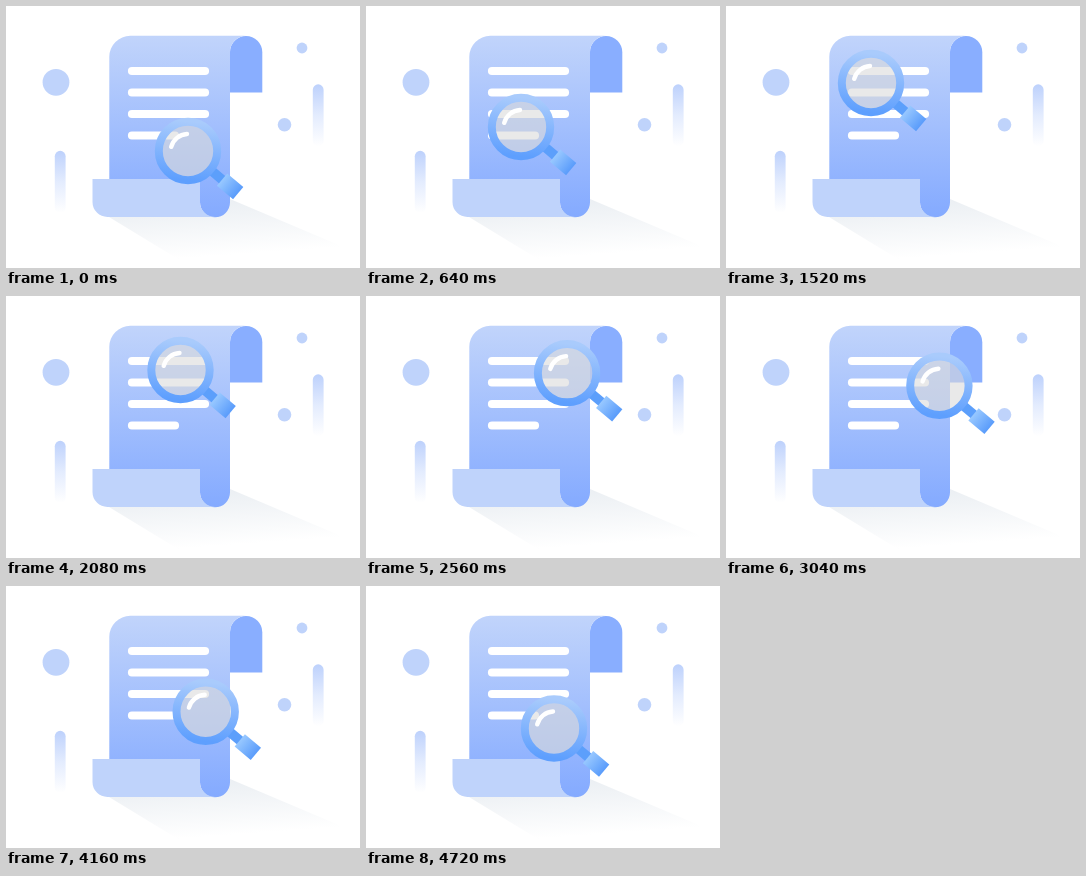
An HTML page that plays this animation: 354x262 px, repeating every 4800 ms.

```html
<!DOCTYPE html>
<html lang="en">
<head>
<meta charset="utf-8">
<title>Document search</title>
<style>
  html, body { margin: 0; width: 100%; height: 100%; overflow: hidden; background: #fff; }
  svg { display: block; width: 100%; height: 100%; }
</style>
</head>
<body>
<svg viewBox="0 0 354 262">
  <defs>
    <linearGradient id="paper" x1="0" y1="0" x2="0" y2="1">
      <stop offset="0" stop-color="#c1d4fb"/>
      <stop offset="1" stop-color="#84aaff"/>
    </linearGradient>
    <linearGradient id="fade" x1="0" y1="0" x2="0" y2="1">
      <stop offset="0" stop-color="#bdd1fc"/>
      <stop offset=".5" stop-color="#bdd1fc" stop-opacity=".42"/>
      <stop offset="1" stop-color="#bdd1fc" stop-opacity="0"/>
    </linearGradient>
    <linearGradient id="shade" gradientUnits="userSpaceOnUse" x1="205" y1="195" x2="209" y2="250">
      <stop offset="0" stop-color="#ebeff3"/>
      <stop offset="1" stop-color="#fff"/>
    </linearGradient>
    <linearGradient id="ring" x1=".55" y1="0" x2=".45" y2="1">
      <stop offset="0" stop-color="#a9cbfc"/>
      <stop offset="1" stop-color="#5e9ffe"/>
    </linearGradient>
    <linearGradient id="grip">
      <stop offset="0" stop-color="#98c8ff"/>
      <stop offset="1" stop-color="#5a9cfb"/>
    </linearGradient>
  </defs>

  <path d="M103 211L190 264H354V248L224 193H200V211Z" fill="url(#shade)"/>
  <g fill="#bfd3fb">
    <circle cx="50" cy="76.3" r="13.4"/>
    <circle cx="296" cy="42" r="5.4"/>
    <circle cx="278.5" cy="118.8" r="6.8"/>
  </g>
  <g fill="url(#fade)">
    <rect x="48.8" y="144.8" width="10.8" height="62" rx="5.4"/>
    <rect x="306.8" y="78.3" width="10.8" height="62" rx="5.4"/>
  </g>

  <path d="M240 30a16.3 16.3 0 0 1 16.3 16.3V86.5H224V46A16 16 0 0 1 240 30Z" fill="#89aeff"/>
  <path d="M124.3 29.8H240.3A16.3 16.3 0 0 0 224 46.1V196.3a15 15 0 0 1-30 0V173H103.3V50.8a21 21 0 0 1 21-21Z" fill="url(#paper)"/>
  <path d="M86.5 173H194V196a15 15 0 0 0 15 15H101.5a15 15 0 0 1-15-15Z" fill="#bfd3fb"/>
  <path d="M126 65H199M126 86.5H199M126 108H199M126 129.5H169" stroke="#fff" stroke-width="8.2" stroke-linecap="round"/>

  <g id="lens">
    <g transform="rotate(40)">
      <rect x="31" y="-4.8" width="16" height="9.6" fill="#5c9ffb"/>
      <rect x="44.5" y="-8" width="21" height="16" fill="url(#grip)"/>
    </g>
    <circle r="26" fill="#dadada" fill-opacity=".6"/>
    <circle r="29.2" fill="none" stroke="url(#ring)" stroke-width="8"/>
    <path d="M-16.8-4.2A17.5 17.5 0 0 1-1-17" fill="none" stroke="#fff" stroke-width="4.4" stroke-linecap="round"/>
  </g>
</svg>
<script>
  const LOOP = 4800, STEP = 80;
  const lens = document.getElementById('lens');

  // Turning points of the lens centre: time, x, y
  const keys = [
    [0, 182, 145], [640, 155, 121], [1120, 142, 97],
    [1520, 145, 77], [2080, 174.5, 74], [2800, 210, 82],
    [3040, 213.4, 89.7], [3680, 208, 111], [4720, 188, 142.5]
  ];
  const last = keys.length - 1;

  const rate = (i, axis) =>
    (keys[i + 1][axis] - keys[i][axis]) / (keys[i + 1][0] - keys[i][0]);

  // Slope at a key, weighted towards the shorter neighbouring span
  function slope(i, axis) {
    if (i === 0) return rate(0, axis);
    if (i === last) return rate(last - 1, axis);
    const before = keys[i][0] - keys[i - 1][0], after = keys[i + 1][0] - keys[i][0];
    return (rate(i - 1, axis) * after + rate(i, axis) * before) / (before + after);
  }

  // Cubic Hermite curve through the keys
  function along(t, axis) {
    let i = 0;
    while (i < last - 1 && t >= keys[i + 1][0]) i++;
    const a = keys[i], b = keys[i + 1], span = b[0] - a[0];
    const u = (t - a[0]) / span, v = 1 - u;
    return a[axis] * v * v * (1 + 2 * u) + b[axis] * u * u * (3 - 2 * u)
      + span * u * v * (slope(i, axis) * v - slope(i + 1, axis) * u);
  }

  function draw(now) {
    const t = Math.floor((now % LOOP) / STEP) * STEP;
    lens.setAttribute('transform', `translate(${along(t, 1).toFixed(2)} ${along(t, 2).toFixed(2)})`);
  }

  function tick() {
    draw(performance.now());
    requestAnimationFrame(tick);
  }
  tick();
</script>
</body>
</html>
```
